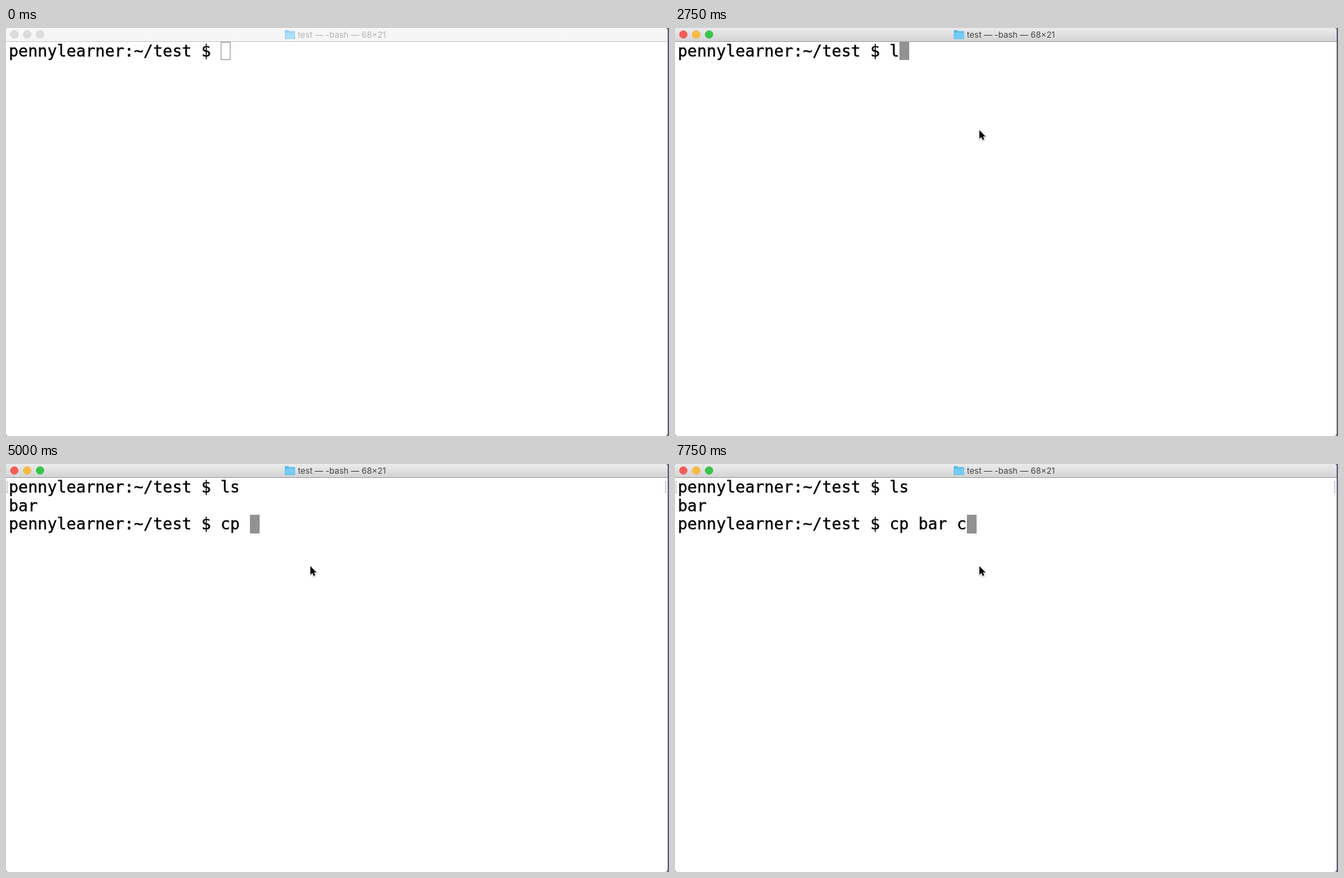
Animation, 954 px wide and 587 px high, one loop 8000 ms. Source, as an HTML page with a canvas:

```html
<!DOCTYPE html>
<html lang="en">
<head>
<meta charset="utf-8">
<title>Terminal session</title>
<style>
  html, body { margin: 0; width: 100%; height: 100%; overflow: hidden; background: #fff; }
  canvas { display: block; }
</style>
</head>
<body>
<canvas id="stage" width="954" height="587"></canvas>
<script>
const ctx = document.getElementById('stage').getContext('2d');
const W = 954, H = 587, LOOP = 8000;
const BAR = 20, WIN_W = 952;
const CELL = 13.846, LEFT = 4, ROW = 26.7;
const PROMPT = 'pennylearner:~/test $ ';

const FOCUS_AT = 1000, ENTER_AT = 3000;
const POINTER = [[500, 727, 34], [750, 438, 147]];
const FIRST = [[2750, 'l']];
const SECOND = [[4250, 'cp'], [5000, 'cp '], [6250, 'cp ba'], [6750, 'cp bar'], [7000, 'cp bar '], [7750, 'cp bar c']];

const latest = (steps, t) => steps.filter(s => s[0] <= t).pop();
const typed = (steps, t) => (latest(steps, t) || [0, ''])[1];

function rect(x, y, w, h, color) {
  ctx.fillStyle = color;
  ctx.fillRect(x, y, w, h);
}

function path(points) {
  ctx.beginPath();
  points.forEach(([x, y]) => ctx.lineTo(x, y));
  ctx.closePath();
}

function drawFolder(active) {
  ctx.fillStyle = active ? '#5bbbe8' : '#97d5f2';
  path([[401, 4], [402, 3], [406, 3], [407.5, 4.5], [416, 4.5], [416, 16], [401, 16]]);
  ctx.fill();
  rect(401.5, 6.5, 14, 9, active ? '#74ccf5' : '#a9dff8');
}

function drawTitleBar(active) {
  const shade = ctx.createLinearGradient(0, 0, 0, BAR);
  shade.addColorStop(0, active ? '#ececec' : '#f7f7f7');
  shade.addColorStop(1, active ? '#d2d2d2' : '#f5f5f5');
  rect(0, 0, WIN_W, BAR, shade);
  rect(0, BAR - 1, WIN_W, 1, active ? '#a0a0a0' : '#c9c9c9');

  const lights = active
    ? [['#fc5b57', '#e2463f'], ['#fdbc40', '#e0a028'], ['#34c84a', '#24ac36']]
    : Array(3).fill(['#dcdcdc', '#c9c9c9']);
  lights.forEach(([fill, edge], i) => {
    ctx.beginPath();
    ctx.arc(12 + i * 18.5, 9.3, 5.4, 0, Math.PI * 2);
    ctx.fillStyle = fill;
    ctx.strokeStyle = edge;
    ctx.lineWidth = 0.8;
    ctx.fill();
    ctx.stroke();
  });

  drawFolder(active);
  ctx.font = '12px Inter, Roboto, sans-serif';
  ctx.fillStyle = active ? '#444' : '#b2b2b2';
  ctx.fillText('test — -bash — 68×21', 420, 14);
}

function drawLine(text, row) {
  const y = Math.round(41 + row * ROW);
  ctx.font = '23px "DejaVu Sans Mono", monospace';
  ctx.fillStyle = ctx.strokeStyle = '#000';
  ctx.lineWidth = 0.35;
  ctx.fillText(text, LEFT, y);
  ctx.strokeText(text, LEFT, y);
}

function drawCaret(col, row, active) {
  const x = Math.round(LEFT + 0.6 + col * CELL);
  const y = Math.round(BAR + row * ROW);
  const h = row ? 27 : 26;
  if (active) {
    rect(x, y, 14, h, '#929292');
  } else {
    ctx.strokeStyle = '#929292';
    ctx.lineWidth = 1;
    ctx.strokeRect(x + 0.5, y + 0.5, 13, h - 1);
  }
}

// Thin brackets marking a finished command
function drawMarks() {
  for (const [edge, inner] of [[1, 1], [949, 948]]) {
    rect(edge, 25, 1, 17, '#b4b4b4');
    rect(inner, 25, 2, 1, '#b4b4b4');
    rect(inner, 41, 2, 1, '#b4b4b4');
  }
}

function drawPointer(x, y) {
  ctx.save();
  ctx.translate(x, y);
  path([[0, 0], [0, 12.2], [2.8, 9.7], [4.8, 14], [7, 13], [5.1, 8.9], [8.9, 8.9]]);
  ctx.lineJoin = 'round';
  ctx.shadowColor = 'rgba(0,0,0,0.35)';
  ctx.shadowBlur = 2;
  ctx.shadowOffsetY = 1;
  ctx.strokeStyle = '#fff';
  ctx.lineWidth = 1.6;
  ctx.stroke();
  ctx.shadowColor = 'transparent';
  ctx.fillStyle = '#000';
  ctx.fill();
  ctx.restore();
}

function draw(t) {
  const active = t >= FOCUS_AT;
  rect(0, 0, W, H, '#5b6675');
  ctx.save();
  ctx.beginPath();
  ctx.roundRect(0, 0, WIN_W, H, [2, 4, 4, 3]);
  ctx.clip();
  rect(0, 0, WIN_W, H, '#fff');
  drawTitleBar(active);

  if (t < ENTER_AT) {
    const line = PROMPT + typed(FIRST, t);
    drawLine(line, 0);
    drawCaret(line.length, 0, active);
  } else {
    const line = PROMPT + typed(SECOND, t);
    drawMarks();
    [PROMPT + 'ls', 'bar', line].forEach(drawLine);
    drawCaret(line.length, 2, active);
  }
  ctx.restore();

  const spot = latest(POINTER, t);
  if (spot) drawPointer(spot[1], spot[2]);
}

const start = performance.now();
function tick() {
  draw((performance.now() - start) % LOOP);
  requestAnimationFrame(tick);
}
tick();
</script>
</body>
</html>
```
